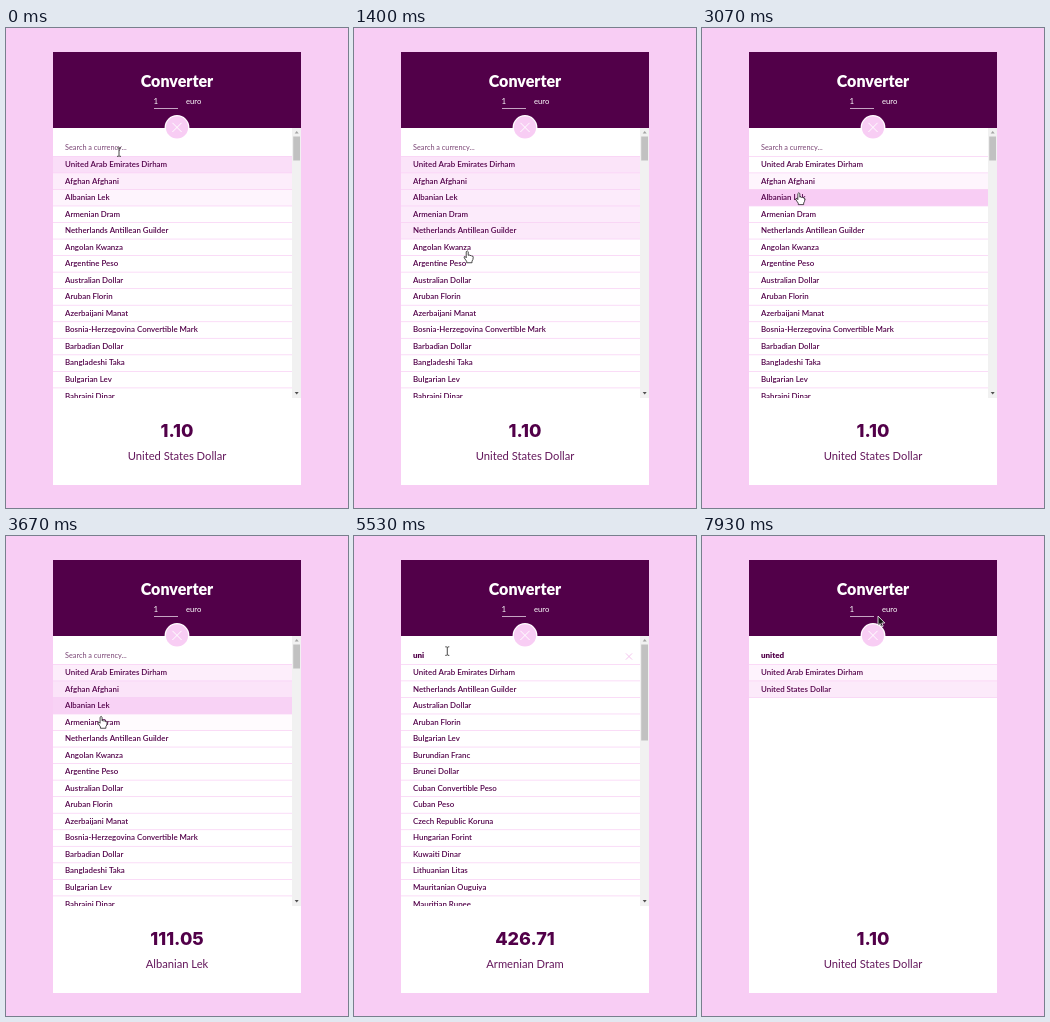
Write an HTML page with a canvas that moves like this. It is 342 px wide and 480 px high and loops after 8 s.

```html
<!DOCTYPE html>
<html lang="en">
<head>
<meta charset="utf-8">
<title>Converter</title>
<style>
  html, body { margin: 0; width: 100%; height: 100%; overflow: hidden; background: #f8cdf4; }
  canvas { display: block; width: 342px; height: 480px; }
</style>
</head>
<body>
<canvas id="stage"></canvas>
<script>
const W = 342, H = 480, LOOP = 8000;
const PINK = '#f8cdf4', PLUM = '#520049', WHITE = '#fff';
const LEFT = 47, RIGHT = 295, PANEL_TOP = 100, LIST_TOP = 128.3, LIST_END = 370, ROW = 16.54;
const TYPING_START = 5130, KEY_TIME = 200;

const canvas = document.getElementById('stage');
const ctx = canvas.getContext('2d');
const ratio = window.devicePixelRatio || 1;
canvas.width = W * ratio;
canvas.height = H * ratio;

const CURRENCIES = ['United Arab Emirates Dirham', 'Afghan Afghani', 'Albanian Lek', 'Armenian Dram',
  'Netherlands Antillean Guilder', 'Angolan Kwanza', 'Argentine Peso', 'Australian Dollar',
  'Aruban Florin', 'Azerbaijani Manat', 'Bosnia-Herzegovina Convertible Mark', 'Barbadian Dollar',
  'Bangladeshi Taka', 'Bulgarian Lev', 'Bahraini Dinar', 'Burundian Franc', 'Brunei Dollar',
  'Cuban Convertible Peso', 'Cuban Peso', 'Czech Republic Koruna', 'Hungarian Forint',
  'Kuwaiti Dinar', 'Lithuanian Litas', 'Mauritanian Ouguiya', 'Mauritian Rupee',
  'United States Dollar'];

const choices = [
  { time: 0, amount: '1.10', name: 'United States Dollar' },
  { time: 3100, amount: '111.05', name: 'Albanian Lek', focused: true },
  { time: 3950, amount: '426.71', name: 'Armenian Dram', focused: true },
  { time: 7100, amount: '1.10', name: 'United States Dollar', focused: true }
];

// Where the pointer pauses or turns: time, x, y
const stops = [
  [-450, 112, 165], [0, 113, 124], [500, 116, 322], [1000, 112, 138], [1180, 112, 138],
  [1780, 116, 414], [2170, 115, 400], [2433, 102, 155], [3000, 97, 169], [3300, 96, 138],
  [3750, 95, 184], [4050, 95, 184], [4300, 92.5, 115], [6670, 94, 115], [7000, 101, 150],
  [7450, 106, 152], [7930, 176, 80]
];

const smooth = u => u * u * (3 - 2 * u);

function pointer(t) {
  const i = stops.findIndex(stop => stop[0] > t);
  const [t1, x1, y1] = stops.at(i);
  if (i < 1) return { x: x1, y: y1 - (i < 0 ? 0 : (t - t1) * 0) };
  const [t0, x0, y0] = stops[i - 1];
  const k = smooth((t - t0) / (t1 - t0));
  return { x: x0 + (x1 - x0) * k, y: y0 + (y1 - y0) * k };
}

const queryAt = t => 'united'.slice(0, Math.max(0, Math.floor((t - TYPING_START) / KEY_TIME) + 1));

// The list answers the typing a little late.
function filterAt(t) {
  if (t < 5270) return '';
  return t < 5670 ? 'u' : queryAt(t);
}

// Replays the recent pointer path so that hover fades depend on time alone.
function hoverLevels(t, count) {
  const levels = new Array(count).fill(0), step = 5, lag = 20;
  for (let age = 900; age >= 0; age -= step) {
    const { y } = pointer(t - lag - age);
    const over = y < LIST_END ? Math.floor((y - LIST_TOP) / ROW) : -1;
    levels.forEach((level, i) => {
      const goal = i === over ? 1 : 0;
      levels[i] += (goal - level) * (1 - Math.exp(-step / (goal ? 55 : 230)));
    });
  }
  return levels;
}

function rect(x, y, w, h, color) {
  ctx.fillStyle = color;
  ctx.fillRect(x, y, w, h);
}

function text(str, x, y, font, color = PLUM, align = 'left') {
  ctx.font = font;
  ctx.fillStyle = color;
  ctx.textAlign = align;
  ctx.fillText(str, x, y);
}

function cross(x, y, r, color) {
  ctx.strokeStyle = color;
  ctx.lineWidth = 1;
  ctx.beginPath();
  ctx.moveTo(x - r, y - r);
  ctx.lineTo(x + r, y + r);
  ctx.moveTo(x + r, y - r);
  ctx.lineTo(x - r, y + r);
  ctx.stroke();
}

function disc(x, y, r, color) {
  ctx.fillStyle = color;
  ctx.beginPath();
  ctx.arc(x, y, r, 0, Math.PI * 2);
  ctx.fill();
}

function triangle(x, y, dir, color) {
  ctx.fillStyle = color;
  ctx.beginPath();
  ctx.moveTo(x - 2, y - dir);
  ctx.lineTo(x + 2, y - dir);
  ctx.lineTo(x, y + dir);
  ctx.fill();
}

function drawHeader() {
  rect(LEFT, 24, RIGHT - LEFT, PANEL_TOP - 24, PLUM);
  text('Converter', 171, 59.3, '900 16px Lato, sans-serif', WHITE, 'center');
  text('1', 147.5, 75.8, '400 8px Lato, sans-serif', WHITE);
  text('euro', 180, 75.8, '400 7.7px Lato, sans-serif', WHITE);
  rect(148, 80.2, 24, 0.8, '#e3cfe1');
}

function drawScrollbar(thumb) {
  rect(286, PANEL_TOP, 9, LIST_END - PANEL_TOP, '#f1f1f1');
  rect(287.2, 108.5, 6.8, thumb, '#c1c1c1');
  triangle(290.7, 104.3, -1.3, '#a3a3a3');
  triangle(290.7, 365.3, 1.3, '#505050');
}

function drawSearch(t) {
  const query = queryAt(t);
  if (query) text(query, 59, 122.3, '900 8px Lato, sans-serif');
  else text('Search a currency...', 59, 122.3, '400 7.3px Lato, sans-serif', '#7b4676');
  const caretOn = t > 4300 && t < TYPING_START && Math.floor(t / 530) % 2;
  if (caretOn) rect(59.2, 116, 0.8, 8, PLUM);
  if (query && t < 7600) cross(275, 120.5, 3.1, '#f5c5ef');
}

function drawList(t, choice) {
  const filter = filterAt(t);
  const rows = CURRENCIES.filter(name => name.toLowerCase().includes(filter));
  const scrolls = rows.length * ROW > LIST_END - LIST_TOP;
  const right = scrolls ? 286 : RIGHT;
  const levels = hoverLevels(t, rows.length);
  ctx.save();
  ctx.beginPath();
  ctx.rect(LEFT, PANEL_TOP, RIGHT - LEFT, LIST_END - PANEL_TOP);
  ctx.clip();
  rect(LEFT, LIST_TOP - 0.3, right - LEFT, 0.7, PINK);
  rows.forEach((name, i) => {
    const y = LIST_TOP + i * ROW;
    const focused = choice.focused && choice.name === name;
    ctx.globalAlpha = Math.max(levels[i], focused ? 0.42 : 0);
    rect(LEFT, y, right - LEFT, ROW, PINK);
    ctx.globalAlpha = 1;
    rect(LEFT, y + ROW - 0.3, right - LEFT, 0.7, PINK);
    text(name, 59, y + 10.7, '600 7.9px Lato, sans-serif');
  });
  if (scrolls) drawScrollbar(filter ? 96 : 24);
  drawSearch(t);
  ctx.restore();
}

const arrow = new Path2D('M0 0V9.6L2.2 7.6L3.7 10.9L5.2 10.2L3.8 7H6.8Z');
const hand = new Path2D('M-1 1Q0 -.8 1 1V4.6Q2 3.6 2.8 4.9Q3.9 4 4.5 5.4Q6 4.8 6 6.5' +
  'Q6 9 4.8 10.4V12H-.6V10.6L-3 7.1Q-3.4 5.2 -1.8 6L-1 7Z');
const beam = new Path2D('M-2 -4.2Q-.4 -4.2 0 -3.6Q.4 -4.2 2 -4.2M0 -3.6V3.8' +
  'M-2 4.4Q-.4 4.4 0 3.8Q.4 4.4 2 4.4');

function drawPointer(t) {
  const { x, y } = pointer(t);
  ctx.save();
  ctx.translate(x, y);
  ctx.lineJoin = 'round';
  if (y > 109 && y < LIST_TOP) {
    ctx.strokeStyle = '#333';
    ctx.lineWidth = 0.9;
    ctx.stroke(beam);
  } else {
    const overRow = y >= LIST_TOP && y < LIST_END;
    const shape = overRow ? hand : arrow;
    ctx.fillStyle = overRow ? WHITE : '#111';
    ctx.strokeStyle = overRow ? '#222' : WHITE;
    ctx.lineWidth = 0.8;
    ctx.fill(shape);
    ctx.stroke(shape);
  }
  ctx.restore();
}

function draw(t) {
  const choice = choices.filter(c => c.time <= t).at(-1);
  ctx.setTransform(ratio, 0, 0, ratio, 0, 0);
  rect(0, 0, W, H, PINK);
  rect(LEFT, 24, RIGHT - LEFT, 433, WHITE);
  drawHeader();
  drawList(t, choice);
  disc(171, 99.4, 12.4, WHITE);
  disc(171, 99.4, 11.1, PINK);
  cross(171, 99.4, 4.6, WHITE);
  text(choice.amount, 171, 409.3, '800 18px Inter, sans-serif', PLUM, 'center');
  text(choice.name, 171, 432, '400 11.2px Lato, sans-serif', '#64185c', 'center');
  drawPointer(t);
}

const started = performance.now();
function frame() {
  draw((performance.now() - started) % LOOP);
  requestAnimationFrame(frame);
}
frame();
</script>
</body>
</html>
```
